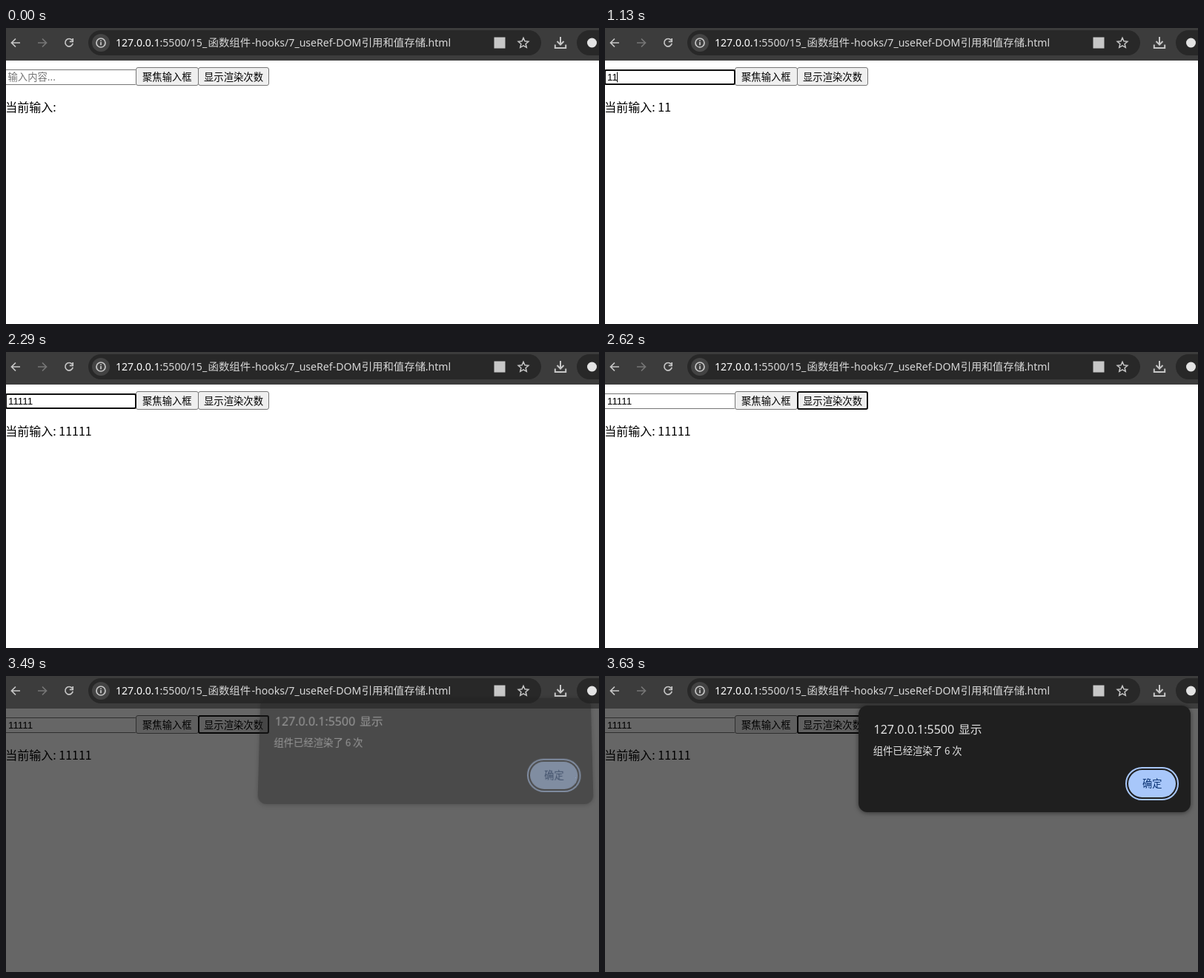
Write an HTML page that moves like this. It is 800 px wide and 400 px high and loops after 3960 ms.

```html
<!DOCTYPE html>
<html lang="zh-CN">
<head>
<meta charset="utf-8">
<title>useRef</title>
<style>
  html, body { margin: 0; width: 100%; height: 100%; overflow: hidden; background: #fff; }
  svg { position: absolute; left: 0; top: 0; }
  text { font-family: "Noto Sans CJK SC", "Noto Sans CJK", sans-serif; white-space: pre; }
  .ui { font-size: 13.333px; }
  .latin { font-family: "Noto Sans", "Open Sans", sans-serif; }
  .url { font-size: 14.1px; fill: #d8d8d8; }
  .url .cjk { font-size: 14.4px; }
  .field { font-family: "Liberation Sans", Arial, sans-serif; font-size: 13.333px; }
  .icon { fill: none; stroke: #c7c7c7; stroke-width: 1.7; }
  .box { fill: #efefef; stroke: #767676; }
  .ring { fill: none; stroke: #101010; stroke-width: 2; }
  #dialog { transform-origin: 566px 112px; }
  #panel { filter: drop-shadow(0 1px 3px rgba(0, 0, 0, .5)); }
</style>
</head>
<body>
<svg width="800" height="400">
  <!-- page -->
  <rect x="-1.5" y="56.5" width="177" height="20" rx="1" fill="#fff" stroke="#767676"/>
  <text id="hint" class="ui" x="2.5" y="71" fill="#757575">输入内容...</text>
  <text id="value" class="field" x="3" y="71"></text>
  <path id="caret" d="M0 59.5V73.5" stroke="#000"/>
  <rect class="box" x="175.5" y="53.5" width="84" height="24" rx="2.5"/>
  <text class="ui" x="184" y="71">聚焦输入框</text>
  <rect class="box" x="259.5" y="53.5" width="95" height="24" rx="2.5"/>
  <text class="ui" x="267" y="71">显示渲染次数</text>
  <rect id="ring" class="ring" rx="2"/>
  <text id="echo" x="-.7" y="113" font-size="16"></text>
  <rect id="shade" y="44" width="800" height="356" opacity=".6"/>

  <!-- toolbar -->
  <rect width="800" height="44" fill="#3c3c3c"/>
  <rect x="111" y="3" width="611" height="34" rx="17" fill="#282828"/>
  <rect x="770" y="3" width="70" height="34" rx="17" fill="#282828"/>
  <g class="icon">
    <path d="M19 20H8M13 14.5L7.5 20L13 25.5"/>
    <path d="M43 20H54M49 14.5L54.5 20L49 25.5" stroke="#767676"/>
    <path d="M89.2 16.5A5.2 5.2 0 1 0 90.2 20.8M90.2 14V18.4H85.8"/>
    <path id="star" stroke-width="1.5"/>
    <path d="M748 12V22M743.5 18L748 22.5L752.5 18M740.8 22.5V27H755.2V22.5" stroke-width="2"/>
  </g>
  <circle cx="128" cy="20" r="12" fill="#434343"/>
  <circle class="icon" cx="128" cy="20" r="6" stroke-width="1.4"/>
  <path d="M128 19V23.2M128 16.6V18" stroke="#dcdcdc" stroke-width="1.5"/>
  <rect x="658.5" y="12.5" width="15" height="15" fill="#c7c7c7"/>
  <circle cx="790.5" cy="20" r="6.5" fill="#e3e3e3"/>
  <text class="url latin" y="25"><tspan x="148" fill="#fff">127.0.0.1</tspan><tspan x="207.5">:5500/15_</tspan><tspan class="cjk" x="272.5">函数组件</tspan><tspan x="331.5">-hooks/7_useRef-DOM</tspan><tspan class="cjk" x="479.7">引用和值存储</tspan><tspan x="565.8">.html</tspan></text>
</svg>

<svg id="dialog" width="800" height="400">
  <rect id="panel" x="342" y="40" width="448" height="144" rx="12" fill="#1f1f1f"/>
  <text class="latin" y="78" font-size="16" fill="#e3e3e3"><tspan x="362.5">127.0.0.1:5500</tspan><tspan x="477" font-size="15.8">显示</tspan></text>
  <text class="ui" x="361.7" y="106" fill="#e3e3e3">组件已经渲染了 6 次</text>
  <rect x="703" y="124" width="70" height="43" rx="21.5" fill="none" stroke="#a8c7fa" stroke-width="2"/>
  <rect x="706" y="127" width="64" height="37" rx="18.5" fill="#a8c7fa"/>
  <text x="725" y="150" font-size="13.2" fill="#062e6f">确定</text>
</svg>

<script>
const LOOP = 3960;
const KEYS = [800, 1130, 1330, 1530, 1750];
// Dialog entrance: start time, vertical offset, tilt in degrees, opacity
const ENTRANCE = [[3420, -19.5, 12, .015], [3490, -11.2, 7, .4], [3560, -3.5, 2.5, .85], [3630, 0, 0, 1]];
// Keyboard focus: start time, ring x, y, width, height
const FOCUS = [[200, 0, 57, 175, 19], [2360, 176, 54, 83, 23], [2620, 260, 54, 94, 23]];

const $ = id => document.getElementById(id);
const show = (id, on) => $(id).style.display = on ? '' : 'none';
const latest = (steps, t) => steps.filter(s => t >= s[0]).pop();

const starPoints = Array.from({ length: 10 }, (_, i) => {
  const r = i % 2 ? 3.3 : 7.2, a = (i / 5 - .5) * Math.PI;
  return [698 + r * Math.cos(a), 20.5 + r * Math.sin(a)];
});
$('star').setAttribute('d', `M${starPoints.join('L')}Z`);

function draw(t) {
  const typed = '1'.repeat(KEYS.filter(k => t >= k).length);
  $('value').textContent = typed;
  $('echo').textContent = '当前输入: ' + typed;
  show('hint', !typed);

  const width = typed ? $('value').getComputedTextLength() : 0;
  $('caret').setAttribute('transform', `translate(${Math.floor(3 + width) + .5} 0)`);
  show('caret', t >= 200 && t < 730 || t >= 800 && t < 2290);

  const focus = latest(FOCUS, t);
  show('ring', focus);
  if (focus) ['x', 'y', 'width', 'height'].forEach((name, i) => $('ring').setAttribute(name, focus[i + 1]));

  const pose = latest(ENTRANCE, t);
  show('shade', pose);
  show('dialog', pose);
  if (pose) {
    const [, y, tilt, opacity] = pose;
    $('dialog').style.opacity = opacity;
    $('dialog').style.transform = tilt ? `translateY(${y}px) perspective(1000px) rotateX(${tilt}deg) scale(1.003)` : 'none';
  }
}

const start = performance.now();
function tick() {
  draw((performance.now() - start) % LOOP);
  requestAnimationFrame(tick);
}
tick();
</script>
</body>
</html>
```
